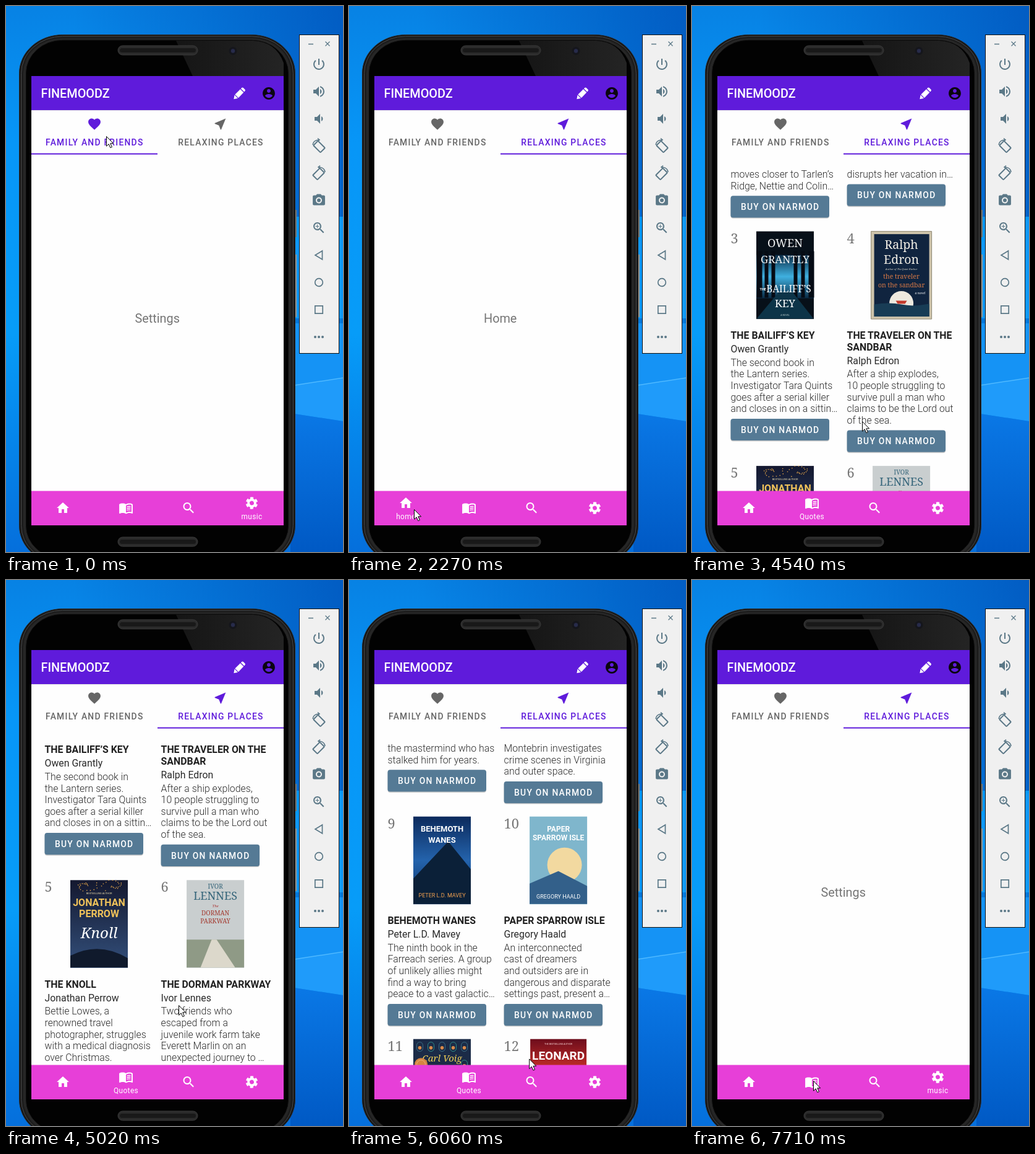
These frames come from a looping animation (545x881 px, 8000 ms). An HTML page:

```html
<!DOCTYPE html>
<html lang="en">
<head>
<meta charset="utf-8">
<title>Phone app walkthrough</title>
<style>
html, body { margin: 0; width: 100%; height: 100%; overflow: hidden; }
svg { display: block; width: 100vw; height: 100vh; }
text { font-family: Roboto, sans-serif; white-space: pre; }
.mid { text-anchor: middle; }
.caps { font-size: 13.88px; font-weight: 500; letter-spacing: 1.24px; }
.page { font-size: 19.83px; fill: #757575; }
.title { font-size: 15.87px; font-weight: 700; fill: #212121; }
.author { font-size: 15.87px; fill: #2a2a2a; }
.desc { font-size: 15.87px; font-weight: 300; fill: #2c2c2c; }
.num { font: 21.8px "Noto Serif", serif; fill: #757575; }
</style>
</head>
<body>
<svg id="stage" viewBox="0 0 545 881" preserveAspectRatio="none"></svg>
<script>
const $ = id => document.getElementById(id);
const PURPLE = '#5f1bdb', SLATE = '#5b7887';

const D = {
  power: 'M13 3h-2v10h2V3zm4.83 2.17l-1.42 1.42C17.99 7.86 19 9.81 19 12c0 3.87-3.13 7-7 7s-7-3.13-7-7c0-2.19 1.01-4.14 2.58-5.42L6.17 5.17C4.23 6.82 3 9.26 3 12c0 4.97 4.03 9 9 9s9-4.03 9-9c0-2.74-1.23-5.18-3.17-6.83z',
  loud: 'M3 9v6h4l5 5V4L7 9H3zm13.5 3c0-1.77-1.02-3.29-2.5-4.03v8.05c1.48-.73 2.5-2.25 2.5-4.02zM14 3.23v2.06c2.89.86 5 3.54 5 6.71s-2.11 5.85-5 6.71v2.06c4.01-.91 7-4.49 7-8.77s-2.99-7.86-7-8.77z',
  quiet: 'M18.5 12c0-1.77-1.02-3.29-2.5-4.03v8.05c1.48-.73 2.5-2.25 2.5-4.02zM5 9v6h4l5 5V4L9 9H5z',
  camera: 'M9 2L7.17 4H4c-1.1 0-2 .9-2 2v12c0 1.1.9 2 2 2h16c1.1 0 2-.9 2-2V6c0-1.1-.9-2-2-2h-3.17L15 2H9zm3 15c-2.76 0-5-2.24-5-5s2.24-5 5-5 5 2.24 5 5-2.24 5-5 5zm0-8a3 3 0 1 0 0 6 3 3 0 1 0 0-6z',
  search: 'M15.5 14h-.79l-.28-.27C15.41 12.59 16 11.11 16 9.5 16 5.91 13.09 3 9.5 3S3 5.91 3 9.5 5.91 16 9.5 16c1.61 0 3.09-.59 4.23-1.57l.27.28v.79l5 4.99L20.49 19l-4.99-5zm-6 0C7.01 14 5 11.99 5 9.5S7.01 5 9.5 5 14 7.01 14 9.5 11.99 14 9.5 14z',
  plus: 'M12.5 10h-2.5v2.5H9V10H6.5V9H9V6.5h1V9h2.5z',
  home: 'M10 20v-6h4v6h5v-8h3L12 3 2 12h3v8z',
  book: 'M21 5c-1.11-.35-2.33-.5-3.5-.5-1.95 0-4.05.4-5.5 1.5-1.45-1.1-3.55-1.5-5.5-1.5S2.45 4.9 1 6v14.65c0 .25.25.5.5.5.1 0 .15-.05.25-.05C3.1 20.45 5.05 20 6.5 20c1.95 0 4.05.4 5.5 1.5 1.35-.85 3.8-1.5 5.5-1.5 1.65 0 3.35.3 4.75 1.05.1.05.15.05.25.05.25 0 .5-.25.5-.5V6c-.6-.45-1.25-.75-2-1zm0 13.5c-1.1-.35-2.3-.5-3.5-.5-1.7 0-4.15.65-5.5 1.5V8c1.35-.85 3.8-1.5 5.5-1.5 1.2 0 2.4.15 3.5.5z',
  lines: 'M13.5 9.6q3-1.2 6-.6v1.4q-3-.6-6 .6zM13.5 12.3q3-1.2 6-.6v1.4q-3-.6-6 .6zM13.5 15q3-1.2 6-.6v1.4q-3-.6-6 .6z',
  heart: 'M12 21.35l-1.45-1.32C5.4 15.36 2 12.28 2 8.5 2 5.42 4.42 3 7.5 3c1.74 0 3.41.81 4.5 2.09C13.09 3.81 14.76 3 16.5 3 19.58 3 22 5.42 22 8.5c0 3.78-3.4 6.86-8.55 11.54z',
  near: 'M21 3L3 10.53v.98l6.84 2.65L12.48 21h.98z',
  user: 'M12 2C6.48 2 2 6.48 2 12s4.48 10 10 10 10-4.48 10-10S17.52 2 12 2zm0 3c1.66 0 3 1.34 3 3s-1.34 3-3 3-3-1.34-3-3 1.34-3 3-3zm0 14.2c-2.5 0-4.71-1.28-6-3.22.03-1.99 4-3.08 6-3.08 1.99 0 5.97 1.09 6 3.08-1.29 1.94-3.5 3.22-6 3.22z',
  pencil: 'M2 22L3.4 14.8 9.2 20.6zM4.2 13.8L13.6 4.6 19.4 10.4 10.2 19.8zM14.6 3.6L16.4 2Q17.6 1.2 18.8 2.2L21.8 5.2Q22.8 6.4 22 7.6L20.4 9.4z'
};
const icon = (d, x, y, fill, s = 23.8) =>
  `<path d="${d}" fill="${fill}" transform="translate(${x - s / 2} ${y - s / 2}) scale(${s / 24})"/>`;
const rect = (x, y, w, h, fill, rest = '') =>
  `<rect x="${x}" y="${y}" width="${w}" height="${h}" fill="${fill}" ${rest}/>`;
const disc = (x, y, r, fill, rest = '') =>
  `<circle cx="${x}" cy="${y}" r="${r}" fill="${fill}" ${rest}/>`;
const text = (x, y, str, cls, rest = '') =>
  `<text x="${x}" y="${y}" class="${cls}" ${rest}>${str}</text>`;
const grad = (id, stops, dir = 'x2="0" y2="1"') => `<linearGradient id="${id}" ${dir}>` +
  stops.map(([o, c, a = 1]) => `<stop offset="${o}" stop-color="${c}" stop-opacity="${a}"/>`).join('') + '</linearGradient>';

// ---- book covers, drawn around x = 0 with the top edge at y = 0
const line = (y, size, fill, str, rest = '') =>
  text(0, y, str, 'mid', `font-size="${size}" fill="${fill}" ${rest}`);
const SERIF = 'style="font-family:\'Noto Serif\',serif"';
const slant = 'font-style="italic" ' + SERIF;
const back = (fill, w = 93) => rect(-w / 2, 0, w, 141.5, fill);
const bold = 'font-weight="700"';

const arches = () => {
  let out = '';
  for (let r = 0; r < 5; r++) for (let c = 0; c < 5; c++) {
    if (r === 2 || (r === 1 && c < 4)) continue;
    out += rect(-41 + c * 18, 5 + r * 29, 10, 15, 'none',
      `rx="5" stroke="${(r + c) % 2 ? '#2f8f8a' : '#3b6f86'}"`) + disc(-36 + c * 18, 14 + r * 29, 2.8, '#d98a4a');
  }
  return out;
};
const pillars = () => [-46, -33, -22, 14, 26, 38].map((x, i) =>
  rect(x, 32, i % 5 ? 6 : 9, 75, '#050b14')).join('');
const sparks = () => Array.from({ length: 40 }, (_, i) => {
  const a = i * 2.4, r = 4 + i % 9 * 2;
  return disc(-22 + (i % 2) * 46 + Math.cos(a) * r, 9 + Math.sin(a) * r * .55, .8, '#e9a94b');
}).join('');

const covers = [
  back('url(#blue)') + line(8, 4, '#bcd', 'The bestselling author of', slant) +
    line(25, 14, '#fff', 'ELENA', SERIF) + line(40, 14, '#fff', 'MARBROOK', SERIF) +
    disc(0, 72.5, 24.5, '#e5ad2c') + disc(0, 72.5, 20.5, 'none', 'stroke="#b77d15"') +
    '<path d="M0 57Q5 72 0 90Q-5 72 0 57M-2 68L-17 62-14 73-2 75 2 75 14 73 17 62 2 68" fill="#f8d76a" stroke="#a8740f" stroke-width=".7"/>' +
    line(109, 10.5, '#fff', 'Leave the Lamps', slant) + line(124, 10.5, '#fff', 'Till I Get Home', slant),
  back('#15172f') + '<path d="M-46.5 141V118Q0 82 46.5 116V141z" fill="#2b2b35"/>' + rect(-46.5, 132, 93, 9.5, '#15172f') +
    line(9, 3.6, '#cbd', 'A NEW NOVEL FROM THE BESTSELLING AUTHOR') +
    line(30, 17, '#f2e35a', 'Romy', bold) + line(48, 17, '#f2e35a', 'Pellard', bold) + line(60, 3.5, '#aab', 'A NOVEL') +
    '<path d="M-22 112Q-8 86 8 91Q16 88 18 96Q20 112-2 115Q-12 113-26 121z" fill="#d0a028"/><path d="M-14 108Q0 93 7 102L-2 113z" fill="#6c5420"/>' +
    ['HALF', 'AN', 'OCEAN', 'HOME'].map((s, i) => line(74 + i * 18.7, 12, '#a8d4ee', s, 'font-weight="500" letter-spacing="3"')).join(''),
  back('#071019') + rect(-46.5, 38, 93, 70, 'url(#glow)') + pillars() +
    '<path d="M-46 141L-10 98H12L46 141z" fill="#0d3448"/>' +
    line(25, 18, '#f4f4f4', 'OWEN', SERIF) + line(51, 17, '#f4f4f4', 'GRANTLY', SERIF) +
    text(-41, 95, 'THE', '', 'font-size="5.5" font-weight="700" fill="#fff"') +
    text(6, 98, 'BAILIFF’S', 'mid', 'font-size="15.5" fill="#fff" ' + SERIF) +
    line(122, 17, '#fff', 'KEY', SERIF) + line(136, 3.6, '#bcc', 'A NOVEL'),
  back('#cdc3aa', 98) + '<path d="M-49 0H49V141.5H-49z" fill="none" stroke="#8f8874"/>' + rect(-44, 4.5, 89, 133, '#10243f') +
    line(28, 19.5, '#f2efe6', 'Ralph', SERIF) + line(52, 19.5, '#f2efe6', 'Edron', SERIF) +
    line(62, 4, '#d8d4c8', 'Author of The Quiet Harbor', slant) +
    line(76, 10.5, '#d87946', 'the traveler', SERIF) + line(90, 10.5, '#d87946', 'on the sandbar', SERIF) +
    disc(0, 116, 19.5, '#eee9df') + text(22, 101, 'a novel', '', 'font-size="5" fill="#fff" ' + slant) +
    '<path d="M-44 118Q-20 114 0 118T45 117V137.5H-44z" fill="#183c55"/><path d="M-9 112H9L6 117H-6z" fill="#c33a2c"/>',
  back('url(#dusk)') + sparks() + line(23, 4, '#f0e0b0', 'BESTSELLING AUTHOR') +
    line(42, 16, '#efc25a', 'JONATHAN', bold) + line(60, 16, '#efc25a', 'PERROW', bold) +
    line(94, 24, '#fff', 'Knoll', slant) + '<path d="M-46.5 141V122Q0 98 46.5 126V141z" fill="#101a2c"/>',
  back('#c9cecf') + line(14, 10, '#35657a', 'IVOR', SERIF) + line(32, 18, '#35657a', 'LENNES', SERIF) +
    line(44, 6, '#a33', 'The', slant) + line(57, 10, '#a33a30', 'DORMAN', SERIF) + line(70, 10, '#a33a30', 'PARKWAY', SERIF) +
    '<path d="M-46.5 141V96H46.5V141z" fill="#8f9a86"/><path d="M-6 96H2L32 141H-24z" fill="#dcd8cb"/>',
  back('#0c0708') + rect(-46.5, 20, 93, 84, 'url(#ember)') + rect(-4, 66, 8, 30, '#100304', 'rx="4"') +
    line(18, 10.2, '#e23236', 'GERALD MATTISON', bold) +
    line(63, 12, '#fff', 'TRUST NO DAWN', 'font-weight="700" font-style="italic" transform="rotate(-3 0 60)"') +
    line(114, 12, '#e23236', 'AN IVAN THORN', bold) + line(135, 18, '#e23236', 'THRILLER', bold),
  back('#120a0c') + rect(-46.5, 10, 93, 84, 'url(#ember)') + line(10, 3.6, '#ddd', 'THE BESTSELLING AUTHOR') +
    line(38, 21, '#fff', 'SUTURES', 'font-weight="900"') + line(68, 4.6, '#e8d5d5', 'A MONTEBRIN NOVEL', 'letter-spacing=".8"') +
    line(96, 18, '#fff', 'VERONICA', bold) + line(123, 17, '#a9d8ea', 'HARTWELL', bold) + line(134, 3.4, '#ddd', 'A GRIPPING NEW CASE'),
  back('url(#blue)') + '<path d="M-46.5 100L10 40 46.5 85V141H-46.5z" fill="#0b2038"/>' +
    line(24, 13, '#fff', 'BEHEMOTH', bold) + line(42, 13, '#fff', 'WANES', bold) + line(130, 9, '#f0a050', 'PETER L.D. MAVEY'),
  back('#7fb6cc') + disc(10, 78, 28, '#f2d9a0') + '<path d="M-46.5 141V108L0 88 46.5 112V141z" fill="#33608a"/>' +
    line(24, 12, '#fff', 'PAPER', bold) + line(38, 12, '#fff', 'SPARROW ISLE', bold) + line(132, 9, '#fff', 'GREGORY HAALD'),
  back('#1b2b47') + arches() + line(36, 15, '#f1cf57', 'Carl Voig', slant) +
    disc(-34, 41, 10.5, '#d58542') + disc(-34, 41, 7, 'none', 'stroke="#f3c68e" stroke-width=".7"') +
    line(45, 3.6, '#eee', 'BESTSELLING AUTHOR') +
    line(80, 10.5, '#f1cf57', 'The TWILIGHT', 'font-weight="700" ' + SERIF) + line(93, 10.5, '#f1cf57', 'ARCHIVE', 'font-weight="700" ' + SERIF),
  back('url(#sunset)', 91) + '<path d="M-45.5 104L-30 92-10 98 10 88 30 96 45.5 90V141.5H-45.5z" fill="#210a0c"/>' +
    line(9, 3.6, '#fdd', 'THE BESTSELLING AUTHOR') + line(33, 19, '#fff', 'LEONARD', bold) + line(58, 18, '#fff', 'TOMSLEY', bold) +
    line(72, 3.8, '#ffe0a0', 'A KROLL AND DUNMORE NOVEL') + line(103, 12, '#fff', 'THE', bold) + line(124, 13.5, '#fff', 'PALE STREET', bold)
];

// title | author | description, lines split by "/"
const books = [
  'LEAVE THE LAMPS/TILL I GET HOME|Elena Marbrook|The ninth book in the/Farwalker series. As/the Seven Harbors War/moves closer to Tarlen’s/Ridge, Nettie and Colin…',
  'HALF AN OCEAN HOME|Romy Pellard|Nina O’Farrow/re-evaluates her/seemingly perfect/life when a pandemic/disrupts her vacation in…',
  'THE BAILIFF’S KEY|Owen Grantly|The second book in/the Lantern series./Investigator Tara Quints/goes after a serial killer/and closes in on a sittin…',
  'THE TRAVELER ON THE/SANDBAR|Ralph Edron|After a ship explodes,/10 people struggling to/survive pull a man who/claims to be the Lord out/of the sea.',
  'THE KNOLL|Jonathan Perrow|Bettie Lowes, a/renowned travel/photographer, struggles/with a medical diagnosis/over Christmas.',
  'THE DORMAN PARKWAY|Ivor Lennes|Two friends who/escaped from a/juvenile work farm take/Everett Marlin on an/unexpected journey to …',
  'TRUST NO DAWN|Gerald Mattison|The 29th book in the Ivan/Thorn series. Thorn fights/the mastermind who has/stalked him for years.',
  'SUTURES|Veronica Hartwell|The 25th book in the/Fay Montebrin series./Montebrin investigates/crime scenes in Virginia/and outer space.',
  'BEHEMOTH WANES|Peter L.D. Mavey|The ninth book in the/Farreach series. A group/of unlikely allies might/find a way to bring/peace to a vast galactic…',
  'PAPER SPARROW ISLE|Gregory Haald|An interconnected/cast of dreamers/and outsiders are in/dangerous and disparate/settings past, present a…',
  'THE TWILIGHT/ARCHIVE|Carl Voig|Lena Pond finds a library/beyond the edge of the/universe that contains/books with multiple/possibilities of the lives …',
  'THE PALE STREET|Leonard Tomsley|A death on New Year’s/Eve, an unsolved murder/and a hunt for serial/rapists bring Kroll and/Dunmore back together.'
];
const rowTop = [273, 651.3, 1029.8, 1388, 1747, 2106];

function bookCard(data, i) {
  const x = i % 2 ? 250.6 : 62.5, top = rowTop[i >> 1];
  let y = top + 152, out = text(x, top + 19.2, i + 1, 'num');
  out += `<g class="cover" transform="translate(${x + 88} ${top})">${covers[i]}</g>`;
  data.split('|').forEach((part, k) => part.split('/').forEach((str, n) => {
    y += n ? 18.65 : 21.7;
    out += text(x, y, str, ['title', 'author', 'desc'][k]);
  }));
  y += 10.6;
  return out + rect(x, y + 1.4, 159.5, 35.2, '#000', 'rx="4" opacity=".2"') + rect(x, y, 159.5, 35.2, '#557a95', 'rx="4"') +
    text(x + 16.5, y + 22.8, 'BUY ON NARMOD', 'caps', 'fill="#fff"');
}

// ---- scene parts
const gear = `<g fill="none" stroke="#fff" transform="translate(397.5 810) rotate(-107.4)"><circle r="5.4" stroke-width="3.9"/><circle r="8.2" stroke-width="3" stroke-dasharray="5 3.587"/></g>`;
const navItems = [
  ['home', 92, icon(D.home, 92, 810, '#fff')],
  ['Quotes', 194, icon(D.book + D.lines, 194, 810, '#fff')],
  ['Search', 295.5, icon(D.search, 295.5, 810, '#fff')],
  ['music', 397.5, gear]
];
const speaker = y => rect(181, y, 129, 15, '#2b2b2b', 'rx="7.5" stroke="#3a3a3a"') + rect(184, y + 4, 123, 7, '#191919', 'rx="3.5"');
const turn = (y, flip) => `<g transform="translate(506 ${y}) scale(${flip} 1)" fill="none" stroke="${SLATE}" stroke-width="2">
  <rect x="-5.2" y="-8" width="10.4" height="16" rx="1" transform="translate(.5 1) rotate(-45)"/><path d="M-10-2Q-9-9.5 0-10M-2-12.5L1-10-2-7.5" stroke-width="1.6"/></g>`;

const wallpaper = rect(0, 0, 545, 881, 'url(#sky)') + rect(0, 0, 545, 340, 'url(#shade)') +
  `<path d="M460 385L545 344V505H460z" fill="#1698f8" opacity=".55"/>
  <path d="M460 504H545V512H460z" fill="#0062c8" opacity=".6"/>
  <path d="M460 512H545V600L460 613z" fill="#1593f5"/><path d="M460 613L545 600V670L460 657z" fill="#1f9bfa"/>
  <path d="M460 613L545 600" stroke="#4fb9ff" stroke-width="1.5"/>
  <path d="M460 657L545 670V881H460z" fill="url(#deep)"/>`;

// rounded body outline, shrunk by a margin
const shell = (m, fill, edge) => rect(21.5 + m, 46.5 + m * .8, 446 - 2 * m, 854 - 1.6 * m, fill,
  `rx="${70 - m}" ry="${62 - m * .8}" stroke="${edge}"`);
const phone = rect(466, 329, 4, 44, '#77746e') + rect(466, 401, 4, 101, '#96938c') +
  shell(0, '#141414', '#2c2c2c') + shell(3, '#1e1e1e', '#4a4a4a') + shell(6, '#262626', '#1a1a1a') + shell(11, '#020202', '#0c0c0c') +
  '<path d="M275 56H400Q437 58 449 92V113H302z" fill="url(#sheen)"/>' +
  speaker(64) + speaker(857) + disc(367, 72.5, 6.5, '#15161c') + disc(367, 72.5, 3.2, '#272b4a');

const emulator = rect(474.5, 46.5, 64, 514, '#f0f0f0', 'stroke="#111"') +
  `<path d="M489 61.5H497M516.5 57.5L523.5 64.5M523.5 57.5L516.5 64.5" stroke="${SLATE}" stroke-width="1.3"/>` +
  icon(D.power, 506, 94, SLATE) + icon(D.loud, 506, 138, SLATE) + icon(D.quiet, 506, 182, SLATE) +
  turn(226, 1) + turn(270, -1) + icon(D.camera, 506, 313.5, SLATE) + icon(D.search + D.plus, 506, 358, SLATE) +
  `<g fill="none" stroke="${SLATE}" stroke-width="1.7"><path d="M511.5 395V409L500 402z"/><circle cx="506" cy="446" r="6.3"/><path d="M499.8 483.8h12.4v12.4h-12.4z"/></g>` +
  [500, 506, 512].map(x => disc(x, 534, 2, SLATE)).join('');

const tabs = `<g id="tabs">${rect(245, 168, 204, 72, PURPLE, 'id="ripple"')}
  <g id="tab0">${icon(D.heart, 143, 190.5, 'inherit')}${text(143.3, 225.2, 'FAMILY AND FRIENDS', 'caps mid')}</g>
  <g id="tab1">${icon(D.near, 346.5, 190.5, 'inherit')}${text(347.5, 225.2, 'RELAXING PLACES', 'caps mid')}</g>
  ${rect(41, 237.6, 204, 2, PURPLE, 'id="bar"')}</g>`;

$('stage').innerHTML = '<defs>' +
  grad('sky', [[0, '#0782e4'], [.25, '#0796f7'], [.6, '#079cf8'], [.8, '#0584ea'], [1, '#056fdc']]) +
  grad('shade', [[.2, '#0050b8', 0], [1, '#0050b8', .75]], 'x2="1" y2="0"') +
  grad('deep', [[0, '#0a78e6'], [1, '#0059c4']]) +
  grad('sheen', [[0, '#151515'], [1, '#242424']], 'x2="1" y2="0"') +
  grad('blue', [[0, '#0c2a5c'], [.5, '#2463ac'], [1, '#0d3267']]) +
  grad('glow', [[0, '#0a2a44'], [.5, '#3fb0e0'], [1, '#0a2a44']]) +
  grad('dusk', [[0, '#14182f'], [1, '#33507c']]) +
  '<radialGradient id="ember"><stop stop-color="#c9262a"/><stop offset=".55" stop-color="#6e1316"/><stop offset="1" stop-color="#120a0c"/></radialGradient>' +
  grad('sunset', [[0, '#6d0d1c'], [.4, '#d4342a'], [.65, '#f58a2c'], [1, '#2a0a0c']]) +
  '<clipPath id="list"><path d="M41 263H449V783H41z"/></clipPath></defs>' +
  wallpaper + phone + emulator + rect(41, 113, 408, 725, '#fefefe') + tabs +
  `<g id="quotes" clip-path="url(#list)"><g id="scroll">${books.map(bookCard).join('')}</g></g>` +
  text(244.7, 510.7, '', 'page mid', 'id="label"') +
  rect(41, 113, 408, 55, PURPLE) + rect(41, 168, 408, 1, '#000', 'opacity=".1"') +
  text(56.5, 148, 'FINEMOODZ', '', 'font-size="19.83" font-weight="500" fill="#fff"') +
  icon(D.pencil, 377.5, 141, '#fff', 22) + icon(D.user, 425, 141, '#0b0610') +
  rect(41, 782.5, 408, 55.5, '#e73fd8') +
  navItems.map(([name, x, art], i) => `<g id="nav${i}">${art}</g>` +
    text(x, 828, name, 'mid', `id="name${i}" font-size="11.9" letter-spacing=".4" fill="#fff"`)).join('') +
  '<path id="cursor" d="M.5.5V16.2L4.2 12.8 6.8 18.7 9.4 17.6 6.8 11.8H11.6z" fill="#fff" stroke="#000" stroke-width="1"/>';

// ---- timing: the picture holds between steps [first, last, count]
const steps = [[0, 0, 1], [120, 240, 2], [490, 610, 2], [750, 990, 3], [1140, 1500, 4], [1770, 1770, 1], [2270, 2630, 4],
  [2780, 2780, 1], [2920, 3400, 5], [3920, 4280, 4], [4420, 5140, 7], [5260, 5260, 1], [5410, 5410, 1], [5550, 5670, 2],
  [5820, 6420, 6], [6560, 6560, 1], [6950, 7070, 2], [7320, 7440, 2], [7580, 7710, 2]]
  .flatMap(([a, b, n]) => Array.from({ length: n }, (_, i) => n > 1 ? a + (b - a) * i / (n - 1) : a));

const path = [[0, 162, 210], [240, 345, 214], [630, 345, 214], [990, 134, 659], [1020, 134, 659], [1500, 99, 813],
  [2150, 99, 813], [2270, 105, 812], [2630, 204, 807], [3800, 204, 807], [4160, 272, 700], [4540, 275, 670],
  [5140, 280, 690], [5670, 290, 766], [6000, 290, 766], [6420, 298, 811], [6830, 298, 811], [7070, 423, 805],
  [7450, 423, 805], [7710, 196, 808]];
const scrollKeys = [[4040, 0], [4540, 287.7], [5140, 610], [5670, 916.5], [6300, 1641.5]];
const barKeys = [[430, 41], [500, 110], [610, 220], [750, 245]];
const rippleKeys = [[480, 0], [490, .1], [610, .12], [750, .07], [990, 0]];
const coverKeys = [[3040, 0], [3280, 1]];

function at(keys, t) {
  const i = keys.findIndex(k => k[0] > t);
  if (i < 1) return keys.at(i).slice(1);
  const a = keys[i - 1], b = keys[i], f = (t - a[0]) / (b[0] - a[0]);
  return a.slice(1).map((v, k) => v + (b[k + 1] - v) * f);
}
const show = (el, on) => el.setAttribute('visibility', on ? 'visible' : 'hidden');
const coverEls = document.querySelectorAll('.cover');

function draw(now) {
  const time = now % 8000, t = steps.findLast(s => s <= time);
  const active = t < 1770 ? 3 : t < 2920 ? 0 : t < 6560 ? 1 : t < 7320 ? 2 : 3;
  const tab = t < 490 ? 0 : 1;
  for (let i = 0; i < 4; i++) {
    $('nav' + i).setAttribute('transform', `translate(0 ${i === active ? -8 : 0})`);
    show($('name' + i), i === active);
  }
  [0, 1].forEach(i => $('tab' + i).setAttribute('fill', i === tab ? PURPLE : '#666'));
  $('bar').setAttribute('x', at(barKeys, t)[0]);
  $('ripple').setAttribute('opacity', at(rippleKeys, t)[0]);
  show($('tabs'), active !== 2);
  $('label').textContent = active === 3 ? 'Settings' : active === 0 && t < 2780 ? 'Home' : '';
  show($('quotes'), active === 1 && t >= 3040);
  $('scroll').setAttribute('transform', `translate(0 ${-at(scrollKeys, t)[0]})`);
  coverEls.forEach(c => c.setAttribute('opacity', at(coverKeys, t)[0]));
  $('cursor').setAttribute('transform', `translate(${at(path, t)})`);
}
const start = performance.now();
(function loop() {
  draw(performance.now() - start);
  requestAnimationFrame(loop);
})();
</script>
</body>
</html>
```
